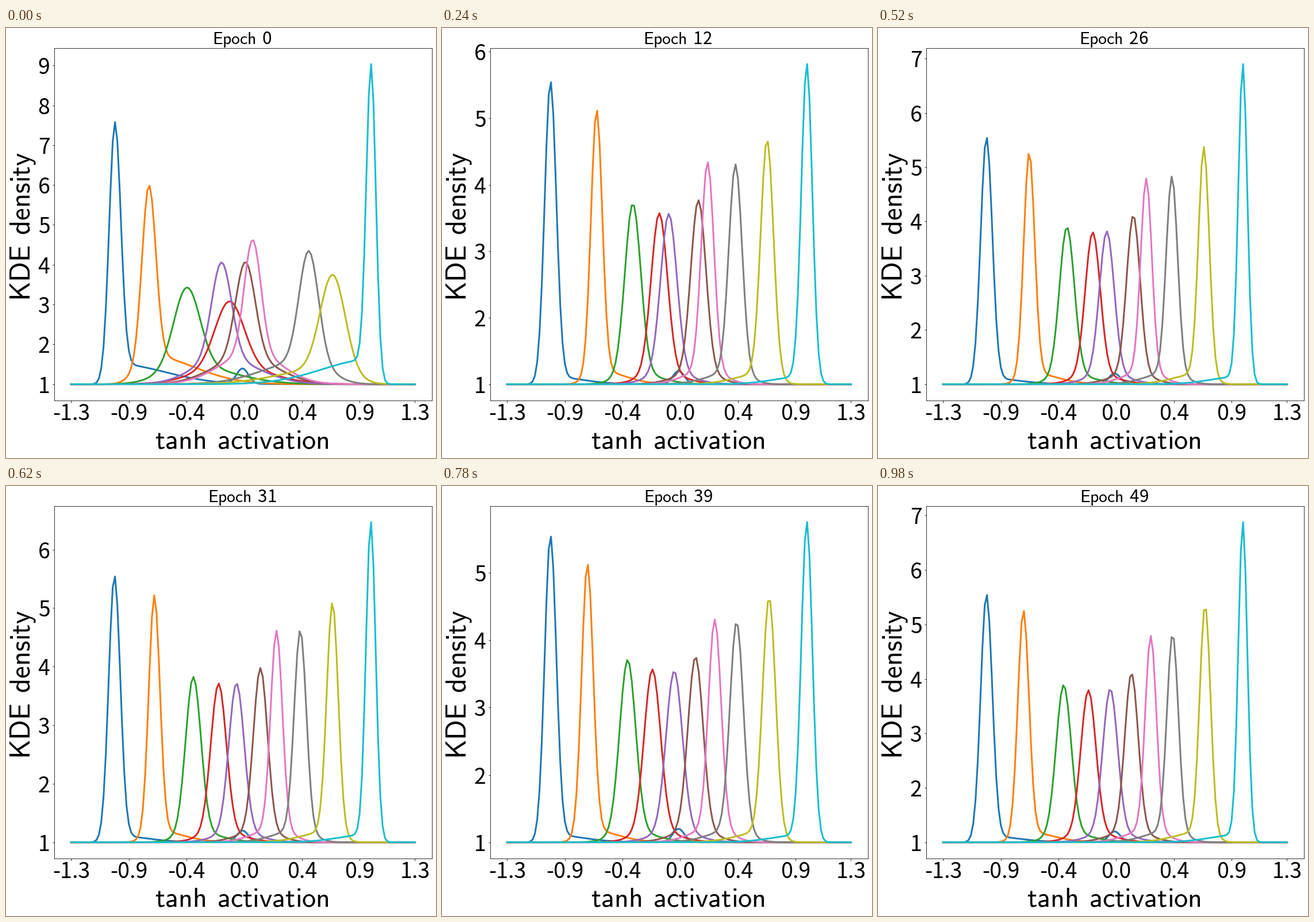
These frames come from a looping animation (748 px wide and 748 px high, 1 s). A matplotlib script:

```python
import numpy as np
import matplotlib.pyplot as plt
from matplotlib.animation import FuncAnimation
from matplotlib.ticker import FuncFormatter, MultipleLocator

SIZE, DPI, EPOCHS = 748, 100, 50
PT = 72 / DPI  # points per pixel
LEFT, RIGHT, TOP, BOTTOM = 83.5, 741.5, 34.8, 647.5
GRID = np.linspace(113.4, 711.4, 150)  # horizontal axis is in stage pixels
ZERO, UNIT = 412.3, 223                # stage position of 0 and length of 1
SETTLED, DRIFTED = 12, 35              # epochs that end the two phases

# Peak position at the start, when settled and after drifting,
# then its height at the start and when settled.
NEURONS = [
    (189.6, 188.7, 188.7, 6.58, 4.56),
    (248.8, 269, 253, 5.0, 4.2),
    (315, 332, 323, 2.43, 2.8),
    (389, 378, 366, 2.08, 2.68),
    (375, 394.5, 404, 3.06, 2.68),
    (416.5, 446, 441, 3.07, 2.93),
    (429, 462, 474.5, 3.63, 3.55),
    (526.5, 510.5, 512.5, 3.35, 3.55),
    (568, 565.5, 569, 2.75, 4.0),
    (635, 634.6, 634.6, 8.04, 5.33),
]

plt.rcParams.update({"mathtext.fontset": "cm", "font.family": "Noto Sans CJK JP"})


def sans(text):
    return r"$\mathsf{%s}$" % text.replace(" ", r"\hspace{0.42}")


def lerp(a, b, t):
    return a + (b - a) * t


def bell(centre, left, right):
    sigma = np.where(GRID < centre, left, right)
    return np.exp(-0.5 * ((GRID - centre) / sigma) ** 2)


def settling(epoch):
    """Fast at first, 1 once the first phase is over."""
    t = min(epoch / SETTLED, 1)
    return (1 - np.exp(-4 * t)) / (1 - np.exp(-4))


def density(epoch, start, settled, drifted, start_height, height):
    mix = settling(epoch)
    drift = np.clip((epoch - SETTLED) / (DRIFTED - SETTLED), 0, 1) ** 2
    centre = lerp(lerp(start, settled, mix), drifted, drift)
    u = (centre - ZERO) / UNIT

    # Settled peaks breathe, more so towards the right.
    wave = np.cos(2 * np.pi * (epoch - 14) / 24)
    height = lerp(start_height, height * (1 - 0.055 * (1 + u) * wave), mix)

    # The area stays the same, so taller peaks are narrower.
    core = lerp(52, 36, mix) * (1 + 0.28 * u * u) / height
    share = lerp(0.22, 0.07, mix) * (1 - 0.65 * u * u)
    spread = lerp(38, 22, mix)
    tail = bell(centre, core + spread * (1 + u), core + spread * (1 - u))
    return 1 + height * lerp(bell(centre, core, core), tail, share)


fig = plt.figure(figsize=(SIZE / DPI, SIZE / DPI), dpi=DPI, facecolor="white")
ax = fig.add_axes([LEFT / SIZE, 1 - BOTTOM / SIZE,
                   (RIGHT - LEFT) / SIZE, (BOTTOM - TOP) / SIZE])
ax.set_xlim(LEFT, RIGHT)
for spine in ax.spines.values():
    spine.set_linewidth(0.8 * PT)
ax.tick_params(length=3.5 * PT, width=0.8 * PT, pad=3.5 * PT, labelsize=37.5 * PT)
ax.yaxis.set_major_locator(MultipleLocator(1))
ax.yaxis.set_major_formatter(FuncFormatter(lambda v, _: f"{v:.0f}"))


def label(x, y, text, size, rotation=0):
    return fig.text(x / SIZE, 1 - y / SIZE, text, fontsize=size * PT,
                    ha="center", va="baseline", rotation=rotation,
                    rotation_mode="anchor")


ticks = GRID[np.minimum(np.arange(0, 151, 25), 149)]
ax.set_xticks(ticks, labels=[])
for x, value in zip(ticks, np.linspace(-1.3, 1.3, len(ticks))):
    label(x, 682.5, f"{value:.1f}" if abs(value) > 0.01 else "0.0", 37.5)

title = label(410.5, 28.5, "", 29.5)
label(410.5, 731, sans("tanh activation"), 48.2)
label(42, 345.5, sans("KDE density"), 48.6, rotation=90)

lines = [ax.plot(GRID, np.ones_like(GRID), color=f"C{i}", lw=3 * PT)[0]
         for i in range(len(NEURONS))]


def update(epoch):
    curves = [density(epoch, *neuron) for neuron in NEURONS]
    curves[0] += lerp(0.38, 0.2, settling(epoch)) * bell(411.5, 10, 10)
    for line, curve in zip(lines, curves):
        line.set_ydata(curve)
    peak = np.max(curves)
    margin = 0.05 * (peak - 1)
    ax.set_ylim(1 - margin, peak + margin)
    title.set_text(sans("Epoch ") + str(epoch))
    return lines + [title]


anim = FuncAnimation(fig, update, frames=EPOCHS, interval=20,
                     init_func=lambda: update(0), repeat=True, repeat_delay=0)
plt.show()
```
